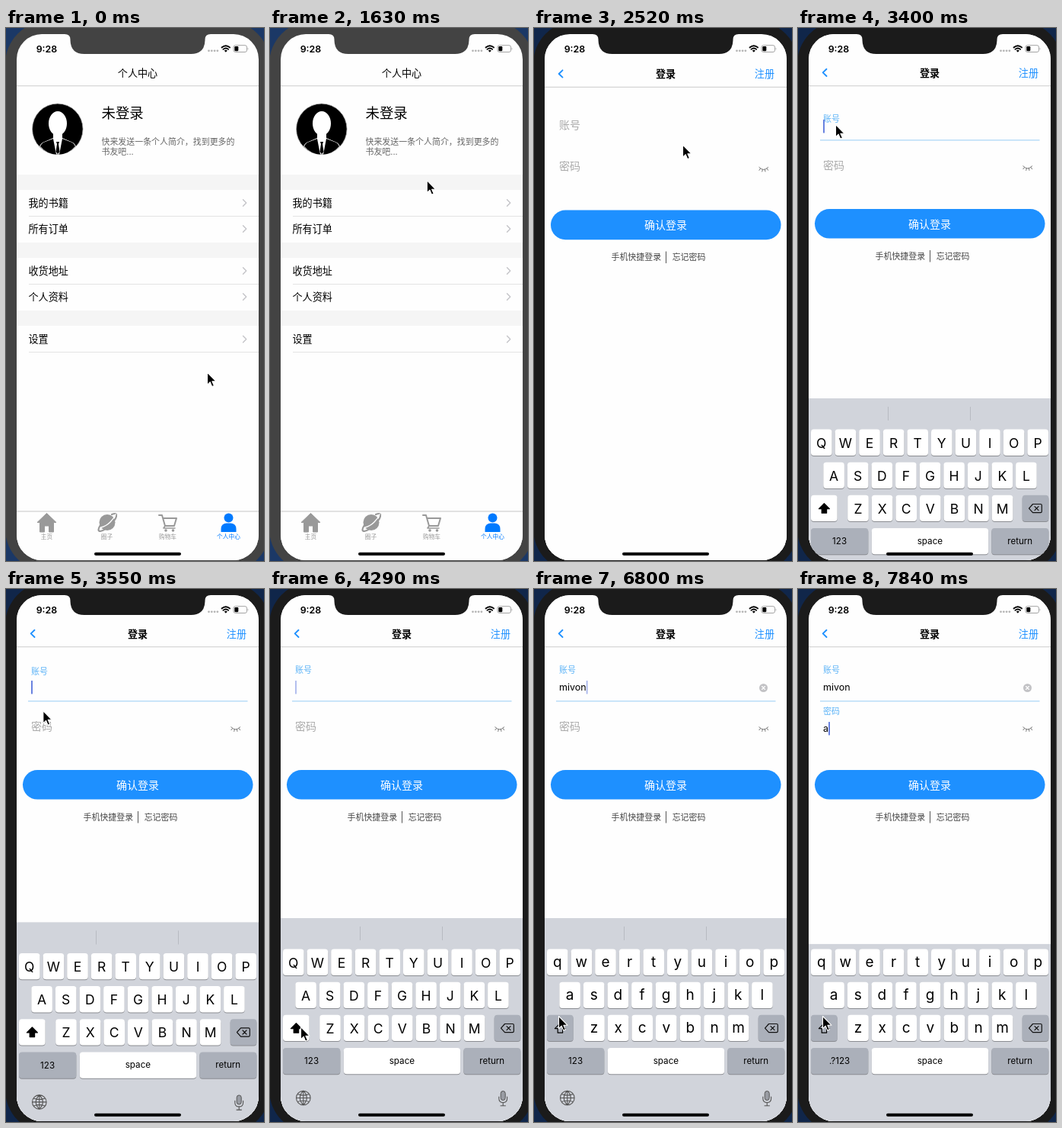
Recreate the animation shown at these times as an HTML page. Size 339 by 698 pixels, loop 7.99 s.

```html
<!DOCTYPE html>
<html lang="zh-CN">
<head>
<meta charset="utf-8">
<title>登录</title>
<style>
  html, body { margin: 0; width: 100%; height: 100%; overflow: hidden; background: #10264a; }
  svg { display: block; width: 339px; height: 698px; }
  text { font-family: Inter, "Noto Sans CJK SC", "Noto Sans CJK", sans-serif; white-space: pre; }
  .line { fill: none; stroke-linecap: round; stroke-linejoin: round; }
</style>
</head>
<body>
<svg id="stage" viewBox="0 0 339 698"></svg>
<script>
const LOOP = 7990, TICKS = 54;
const BLUE = '#1e90ff', GRAY_KEY = '#abb0ba';
const USER = 'mivon';

// Markup helpers; text is placed by its vertical centre.
const text = (x, cy, size, str, fill = '#000', attrs = '') =>
  `<text x="${x}" y="${cy + size * .37}" font-size="${size}" fill="${fill}" ${attrs}>${str}</text>`;
const mid = (x, cy, size, str, fill, attrs = '') =>
  text(x, cy, size, str, fill, `text-anchor="middle" ${attrs}`);
const rect = (x, y, w, h, fill, r = 0, attrs = '') =>
  `<rect x="${x}" y="${y}" width="${w}" height="${h}" rx="${r}" fill="${fill}" ${attrs}/>`;
const line = (d, stroke, width = 1, attrs = '') =>
  `<path class="line" d="${d}" stroke="${stroke}" stroke-width="${width}" ${attrs}/>`;
const shape = (d, fill, attrs = '') => `<path d="${d}" fill="${fill}" ${attrs}/>`;

function listRow(y, label) {
  return text(29.5, y, 13.1, label) + line(`M311.5 ${y - 4.2}l4.2 4.2l-4.2 4.2`, '#c4c4c8', 1.4);
}

function avatar() {
  return `<circle cx="67.8" cy="132.3" r="33.3" fill="#000" stroke="#bbb" stroke-width=".8"/>
    <ellipse cx="68" cy="125" rx="12" ry="16" fill="#fff"/>
    ${shape('M62 137h12v7l14 6q3 2 4 5q-10 10-24 10t-24-10q1-3 4-5l14-6z', '#fff')}
    ${shape('M62 145l-13 5q-3 2-4 5q9 10 21 10.500zM74 145l13 5q3 2 4 5q-9 10-21 10.500z', '#000')}
    ${shape('M66 149h4l-1 3l1.500 10l-2.500 3l-2.500-3l1.500-10z', '#000')}`;
}

function tabs() {
  const g = '#999', b = '#007aff';
  const label = (x, s, c) => mid(x, 665.7, 7.7, s, c, 'font-weight="500"');
  return rect(14, 633, 318, 64, '#fefefe') + rect(14, 632.5, 318, 1, '#c8c8c8') +
    shape('M53.500 635.500L66 647.500h-3.500v12.500h-6v-8h-6v8h-6v-12.500H41z', g, `stroke="${g}" stroke-linejoin="round"`) +
    `<circle cx="133" cy="647.500" r="10.500" fill="${g}"/>` +
    line('M124 651q-5 8 0 8q6-1 14-9t7-13q-1-2-6 0', g, 2.2) +
    line('M125 654q7-2 12-7t7-10', '#fefefe', 1.4) +
    line('M201 638h4l4 14h12l3-10h-17', g, 2) + line('M209 652l-2 3h15', g, 1.6) +
    `<circle cx="210" cy="658" r="1.800" fill="${g}"/><circle cx="219.500" cy="658" r="1.800" fill="${g}"/>` +
    `<circle cx="292.500" cy="641.500" r="6" fill="${b}"/>` +
    shape('M282.500 660v-4q0-7 7-7.500h6q7 .5 7 7.500v4z', b) +
    label(53.5, '主页', g) + label(132.5, '圈子', g) + label(212.5, '购物车', g) + label(292.5, '个人中心', b);
}

function home() {
  return rect(14, 8, 318, 689, '#fefefe') +
    mid(173, 58.7, 13.1, '个人中心', '#000', 'font-weight="500"') +
    rect(14, 75.3, 318, 1, '#ccc') + avatar() +
    text(125.5, 111.5, 18.4, '未登录') +
    text(125.5, 149, 10.95, '快来发送一条个人简介，找到更多的', '#666') +
    text(125.5, 162, 10.95, '书友吧...', '#666') +
    [192, 281, 370].map(y => rect(14, y, 318, 20, '#f5f5f5')).join('') +
    [246, 335, 424].map(y => rect(30, y, 302, .9, '#e0e0e0')).join('') +
    listRow(229, '我的书籍') + listRow(263, '所有订单') + listRow(318, '收货地址') +
    listRow(352, '个人资料') + listRow(407.5, '设置') + tabs();
}

function login() {
  return `<g id="sheet">` + rect(14, 8, 318, 690, '#fefefe') +
    line('M37.500 53.800l-4.800 4.600l4.800 4.600', BLUE, 1.9) +
    mid(173, 58.7, 13.1, '登录', '#000', 'font-weight="600"') +
    text(289.8, 58.7, 13.1, '注册', BLUE) + rect(14, 75.3, 318, 1, '#ccc') +
    text(33, 125.5, 14, '账号', '#aaa', 'id="userLabel"') +
    text(33, 179.5, 14, '密码', '#aaa', 'id="passLabel"') +
    text(33, 128.5, 12.5, '', '#000', 'id="user"') + text(33, 182.5, 12.5, '', '#000', 'id="pass"') +
    rect(29, 146.3, 288.5, 1.2, '#a9d5f7', 0, 'id="underline"') +
    rect(33, 120, 1.6, 17.5, '#4463d8', .5, 'id="caret"') +
    `<g id="clear"><circle cx="301.500" cy="129.500" r="5.500" fill="#c3c3c6"/>` +
    line('M299.500 127.500l4 4m0-4l-4 4', '#fff', 1.1) + `</g>` +
    line('M295.800 180.800q5.800 6.400 11.800 0M297.500 182.500l-1.600 2.200M300.300 184l-.6 2.400M303.300 184l.6 2.400M306 182.500l1.600 2.200', '#777') +
    rect(22, 237, 302.5, 38.6, BLUE, 19.3) +
    mid(173, 256.5, 14, '确认登录', '#fff') +
    text(101.5, 298.7, 10.95, '手机快捷登录', '#444') + rect(173, 291, 1, 15.5, '#555') +
    text(181.7, 298.7, 10.95, '忘记密码', '#444') + `</g>`;
}

function keyboard() {
  const H = 34.3, PITCH = 31.6, W = 27.6;
  const key = (x, y, w, fill, id = '') =>
    rect(x, y + 1, w, H, '#8b8d92', 4) + rect(x, y, w, H, fill, 4, id);
  const rows = [['qwertyuiop', 17, 471.6], ['asdfghjkl', 33.3, 514.7], ['zxcvbnm', 65.2, 557.8]];
  let keys = '', upper = '', lower = '';
  for (const [letters, x0, y] of rows) {
    [...letters].forEach((ch, i) => {
      const x = x0 + i * PITCH, cx = x + W / 2;
      keys += key(x, y, W, '#fff');
      upper += mid(cx, y + 17.6, 17.5, ch.toUpperCase());
      lower += mid(cx, y + 16.3, 19, ch);
    });
  }
  const y4 = 601;
  return `<g id="keyboard">` + rect(14, 431, 318, 267, '#d1d4db', 0, 'id="board"') +
    `<g id="extras">` + rect(118, 442, 1, 18, '#b7bac2') + rect(226, 442, 1, 18, '#b7bac2') +
    line('M34.500 666.500a9.300 9.300 0 1 0 18.600 0a9.300 9.300 0 1 0-18.600 0h18.600M43.800 657.200v18.600M43.800 657.200q-9 9.300 0 18.600q9-9.300 0-18.600M36.500 661.500q7.300 3 14.600 0M36.500 671.500q7.300-3 14.600 0', '#555', 1.1) +
    rect(303.2, 657.5, 6, 12, '#999ca3', 3, 'stroke="#555"') +
    line('M300.800 665v2q0 5.500 5.400 5.500t5.400-5.500v-2M306.200 672.500v4M303 676.700h6.400', '#555', 1.1) + `</g>` + keys +
    `<g id="upper">${upper}</g><g id="lower">${lower}</g>` +
    key(17, 557.8, 34.6, '#fff', 'id="shift"') +
    `<path id="arrow" d="M34.400 568.600l7 7h-3.800v5.600h-6.400v-5.600h-3.800z" stroke="#000" stroke-width="1.200" stroke-linejoin="round"/>` +
    key(294.7, 557.8, 34.6, GRAY_KEY) +
    line('M308.500 569.500h10.200q1.600 0 1.600 1.600v8q0 1.600-1.600 1.600h-10.200l-5-5.600zM311 572.600l5 5m0-5l-5 5', '#111', 1.2) +
    key(17, y4, 75.3, GRAY_KEY) + key(96.8, y4, 153.3, '#fff') + key(254.3, y4, 75, GRAY_KEY) +
    mid(54.6, 618, 11.6, '123', '#000', 'id="digits"') +
    mid(173.4, 617.3, 11.7, 'space') + mid(291.7, 617.3, 11.5, 'return') + `</g>`;
}

function statusBar() {
  const dots = [266.5, 270.3, 274.1, 277.9].map(x => `<circle cx="${x}" cy="29.800" r="1.400" fill="#b5b5b5"/>`).join('');
  return text(39.7, 27, 12.4, '9:28', '#000', 'font-weight="600"') + dots +
    line('M283.500 25.500q5.300-4.600 10.600 0M285.400 27.900q3.400-2.800 6.800 0', '#000', 1.8, 'stroke-linecap="butt"') +
    shape('M286.700 29.600q2.100-1.700 4.200 0l-2.100 2.200z', '#000') +
    rect(299, 22.7, 17.5, 8.8, 'none', 2.4, 'stroke="#999" stroke-width=".9"') +
    rect(300.3, 24, 5, 6.2, '#000', 1.2) + shape('M317.700 25.700q1.800 1.400 0 2.800z', '#999');
}

document.getElementById('stage').innerHTML =
  `<defs><clipPath id="screen">${rect(14, 8, 318, 689, '#fff', 33)}</clipPath></defs>` +
  rect(0, 0, 339, 698, '#10264a', 0, 'id="desktop"') +
  `<g id="bezel">${rect(-1, -9, 348, 721, 'inherit', 56).replace('fill="inherit"', '')}</g>` +
  `<g clip-path="url(#screen)">${home()}${login()}${keyboard()}</g>` +
  `<path id="notch" d="M77 7V8Q84.500 8 84.500 15V16Q85 34 103 34H243Q261 34 261.500 16V15Q261.500 8 269 8V7z"/>` +
  statusBar() + rect(116, 686.8, 114, 4, '#000', 2) +
  `<path id="pointer" d="M0 0V16.200L3.700 12.700L6.200 18.600L8.900 17.400L6.400 11.700H11.400z" fill="#000" stroke="#fff" stroke-width="1.100" stroke-linejoin="round"/>`;

const el = {};
document.querySelectorAll('[id]').forEach(e => el[e.id] = e);
const set = (e, attrs) => { for (const k in attrs) e.setAttribute(k, attrs[k]); };
const show = (e, on) => set(e, { display: on ? 'inline' : 'none' });
const shift = (e, x, y) => set(e, { transform: `translate(${x} ${y})` });

// Pointer path: start tick, end tick, destination.
const START = [264.5, 451];
const MOVES = [[8, 12, 195.5, 153], [17, 21, 49.5, 126.5], [23, 29, 40.5, 573.5], [33, 35, 32.5, 559.5]];
// Caret opacity from each tick on.
const BLINK = [[0, 0], [22, 1], [26, .5], [27, 0], [29, .5], [30, 1], [33, .5], [34, 0], [37, 1], [46, .5], [47, 0], [49, 1]];

const smooth = (a, b, n) => {
  const p = Math.min(1, Math.max(0, (n - a) / (b - a)));
  return p * p * (3 - 2 * p);
};

function pointerAt(n) {
  let [x, y] = START;
  for (const [a, b, tx, ty] of MOVES) {
    const p = smooth(a, b, n);
    x += (tx - x) * p;
    y += (ty - y) * p;
  }
  return [x, y];
}

// A field label shrinks, turns blue and floats up after focus.
function floatLabel(label, restY, age) {
  const up = age > 0, size = up ? 11 : 14;
  const rise = [0, 7, 17.5][Math.max(0, age)] ?? 19.5;
  set(label, { y: restY - rise + size * .37, 'font-size': size, fill: up ? '#5cb3f7' : '#aaa' });
}

function draw(n) {
  const active = n >= 14, focus = n >= 22, caps = n < 30, secret = n >= 49;
  const settle = .1;

  set(el.desktop, { fill: active ? '#10264a' : '#1b3866' });
  for (const e of [el.bezel, el.notch]) set(e, { fill: active ? '#1b1b1b' : '#434343' });
  shift(el.sheet, 0, n < 15 ? 700 : 157 * settle ** (n - 15));
  shift(el.keyboard, 0, n < 23 ? 300 : 54 * settle ** (n - 23));

  floatLabel(el.userLabel, 125.5, n - 22);
  floatLabel(el.passLabel, 179.5, n - 49);
  show(el.underline, focus);

  el.user.textContent = USER.slice(0, Math.max(0, n - 37));
  el.pass.textContent = n >= 53 ? 'a' : '';
  show(el.clear, n >= 38);
  const field = secret ? el.pass : el.user;
  const width = field.textContent ? field.getComputedTextLength() : 0;
  set(el.caret, {
    x: 33.2 + width, y: secret ? 174 : 120,
    opacity: BLINK.filter(b => b[0] <= n).pop()[1]
  });

  show(el.upper, caps);
  show(el.lower, !caps);
  set(el.shift, { fill: caps ? '#fff' : GRAY_KEY });
  set(el.arrow, { fill: caps ? '#000' : 'none' });
  const left = secret ? .3 ** (n - 48) : 1;
  const top = 465 - 34 * left;
  set(el.board, { y: top, height: 698 - top });
  set(el.extras, { opacity: left < .05 ? 0 : left });
  el.digits.textContent = secret ? '.?123' : '123';

  shift(el.pointer, ...pointerAt(n));
}

let last = -1;
function loop() {
  const phase = (performance.now() % LOOP) / LOOP;
  const n = Math.min(TICKS - 1, Math.floor(phase * TICKS + .08));
  if (n !== last) draw(last = n);
  requestAnimationFrame(loop);
}
loop();
</script>
</body>
</html>
```
